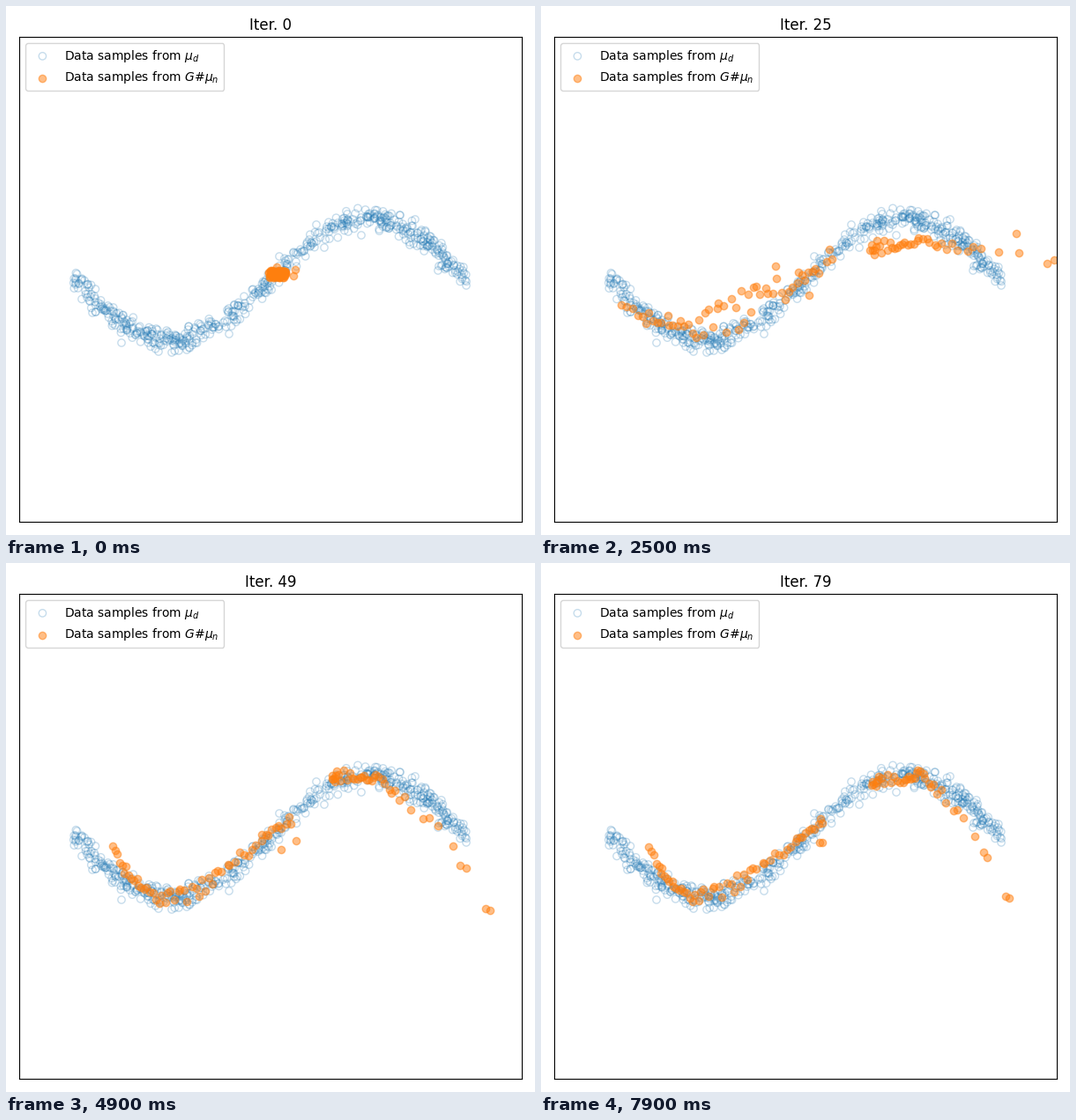
Write a matplotlib script that moves like this. It is 600 px wide and 600 px high and loops after 8000 ms.

```python
import numpy as np
import matplotlib.pyplot as plt
from matplotlib.animation import FuncAnimation

FRAMES, STEP = 80, 100
rng = np.random.default_rng(12)


def wave(x):
    return 310 - 68.75 * np.sin((x - 300) / 71.25)


# Data cloud: noisy sine plus a few strays
data_x = rng.uniform(76, 524, 560)
data_y = wave(data_x) + np.clip(rng.normal(0, 6.3, data_x.size), -13, 13)
strays = np.array([
    (131, 382), (253, 372), (188, 393), (196, 391), (205, 390), (352, 248),
    (86, 310), (310, 284), (403, 260), (490, 300), (491, 295), (458, 271),
    (98, 348), (464, 242), (361, 274), (173, 392)])
data = np.vstack([np.column_stack([data_x, data_y]), strays])

# Latent samples: u runs along two sheets (0..1 and 1.1..2.1), v across them
N_LEFT, N_RIGHT = 56, 38


def spaced(n):
    return (np.arange(n) + rng.uniform(0, 1, n)) / n


u = np.concatenate([spaced(N_LEFT), [1.0], 1.1 + spaced(N_RIGHT), [2.1]])
v = rng.uniform(-1, 1, u.size)
v[-1] = 0

U = [0, .06, .2, .35, .5, .65, .8, .93, 1, 1.1, 1.3, 1.5, 1.7, 1.9, 2.02, 2.1]
SPREAD_U = [0, .25, .55, .85, 1.6]


def pose(xs, ys, spread, loose):
    """Sample positions for one state of the generator."""
    x = np.interp(u, U, xs)
    y = np.interp(u, U, ys) + v * np.interp(u, SPREAD_U, spread)
    return np.vstack([np.column_stack([x, y]), loose])


def stretch(p, k):
    return (p - (300, 312)) * (k, 1 + (k - 1) / 2) + (300, 312)


p9 = pose(
    [22, 58, 108, 141, 190, 222, 283, 304, 328, 388, 412, 434, 479, 510, 541, 577],
    [382, 380, 365, 372, 345, 340, 318, 318, 312, 284, 283, 281, 269, 260, 250, 244],
    [8, 17, 30, 18, 13], [(309, 327), (289, 282), (576, 204)])
p18 = pose(
    [135, 152, 180, 206, 230, 255, 285, 307, 317, 355, 364, 388, 410, 440, 490, 585],
    [352, 355, 350, 352, 338, 330, 312, 303, 277, 283, 282, 276, 275, 275, 276, 287],
    [8, 14, 20, 14, 5], [(314, 320), (267, 290), (486, 248)])
p31 = pose(
    [50, 74, 118, 158, 200, 236, 282, 312, 340, 386, 398, 418, 446, 482, 520, 579],
    [338, 345, 360, 370, 357, 342, 317, 303, 283, 275, 266, 264, 263, 269, 282, 288],
    [5, 10, 25, 12, 6], [(297, 335), (266, 299), (580, 266)])
p49 = pose(
    [120, 128, 150, 176, 208, 240, 282, 308, 323, 369, 376, 400, 420, 449, 499, 549],
    [326, 338, 362, 380, 375, 357, 319, 300, 292, 246, 241, 240, 247, 266, 310, 394],
    [8, 7, 9, 7, 7], [(312, 325), (329, 315), (515, 343)])
p67 = pose(
    [83, 93, 117, 150, 190, 231, 280, 308, 328, 390, 400, 428, 445, 470, 520, 585],
    [327, 338, 364, 381, 376, 356, 318, 298, 285, 255, 245, 242, 238, 248, 305, 423],
    [9, 6, 9, 7, 16], [(312, 332), (328, 312), (551, 333)])
p79 = pose(
    [120, 130, 150, 174, 208, 240, 282, 306, 319, 374, 385, 412, 428, 452, 485, 531],
    [326, 339, 364, 379, 370, 353, 321, 303, 292, 253, 245, 244, 241, 258, 300, 380],
    [7, 5, 9, 4, 7], [(316, 317), (319, 317), (502, 328)])

n = len(p9)
p0 = np.column_stack([rng.uniform(298, 317, n), rng.uniform(300, 308, n)])
p0[-4:] = (326, 306), (300, 300), (307, 296), (328, 299)

KEYS = [(0, p0), (7, stretch(p9, 1.06)), (9, p9), (18, p18), (31, p31),
        (49, p49), (62, stretch(p67, 1.04)), (67, p67),
        (73, .2 * p67 + .8 * p79), (79, p79)]


def samples(t):
    for (t0, a), (t1, b) in zip(KEYS, KEYS[1:]):
        if t <= t1:
            k = (t - t0) / (t1 - t0)
            if t0 > 0:
                k = (1 - np.cos(np.pi * k)) / 2
            return a + (b - a) * k


fig = plt.figure(figsize=(6, 6), dpi=100, facecolor="white")
ax = fig.add_axes([15 / 600, 15 / 600, 570 / 600, 550 / 600])
ax.set(xlim=(15, 585), ylim=(585, 35), xticks=[], yticks=[])
ax.scatter(*data.T, s=36, facecolors="none", edgecolors="tab:blue",
           linewidths=1, alpha=.25, label=r"Data samples from $\mu_d$")
dots = ax.scatter(*p0.T, s=36, color="tab:orange", alpha=.5,
                  label=r"Data samples from $G\#\mu_n$")
ax.legend(loc="upper left")
title = ax.set_title("Iter. 0")


def update(t):
    dots.set_offsets(samples(t))
    title.set_text(f"Iter. {t}")
    return dots, title


anim = FuncAnimation(fig, update, frames=FRAMES, interval=STEP,
                     repeat=True, repeat_delay=0, blit=False)
plt.show()
```
